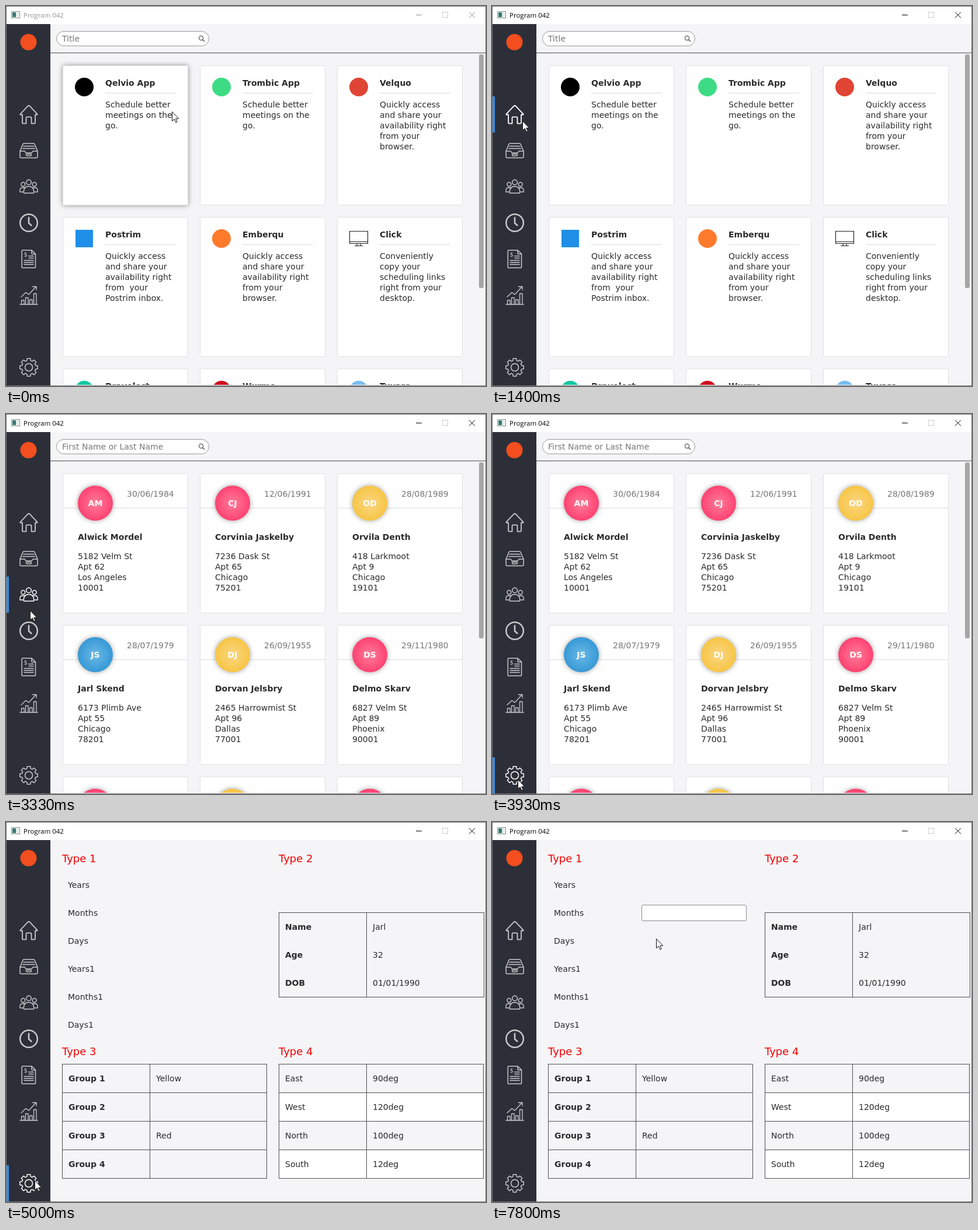
An HTML page that plays this animation: 822x652 px, repeating every 8000 ms.

```html
<!DOCTYPE html>
<html lang="en">
<head>
<meta charset="utf-8">
<title>Dashboard</title>
<style>
html, body { margin: 0; width: 100%; height: 100%; overflow: hidden; background: #f5f5f8; }
svg { display: block; width: 822px; height: 652px; }
text { font: 14px "DejaVu Sans", Verdana, sans-serif; fill: #2b2b2b; white-space: pre; }
.bold { font-weight: bold; }
.muted { fill: #777; }
.heading { font-size: 18px; fill: #f00000; }
.initials { font-weight: bold; fill: #fff; text-anchor: middle; }
.caption { font: 11.5px "Open Sans", "Noto Sans", sans-serif; fill: var(--title-ink); }
.control { fill: none; stroke: var(--title-ink); }
.card { fill: #fff; stroke: #e0e0e4; }
.card.lit { filter: drop-shadow(0 0 4px rgba(0, 0, 0, .42)); }
.rule { stroke: #dcdcdc; }
.grid { fill: none; stroke: #505052; }
.field { fill: #fff; stroke: #8c8c8c; }
.icon { fill: none; stroke: #c9c9cc; stroke-width: 1.5; stroke-linejoin: round; stroke-linecap: round; }
.icon text { font-size: 10px; fill: #c9c9cc; stroke: none; }
.icon.lit { stroke: #fff; }
.icon.lit text { fill: #fff; }
.avatar { filter: drop-shadow(0 0 4px rgba(0, 0, 0, .38)); }
</style>
</head>
<body>
<svg id="stage" viewBox="0 0 822 652"></svg>
<script>
const text = (x, y, s, cls = '') => `<text x="${x}" y="${y}" class="${cls}">${s}</text>`;
const rect = (x, y, w, h, attrs = '') => `<rect x="${x}" y="${y}" width="${w}" height="${h}" ${attrs}/>`;
const circle = (x, y, r, attrs = '') => `<circle cx="${x}" cy="${y}" r="${r}" ${attrs}/>`;
const path = (d, attrs = '') => `<path d="${d}" ${attrs}/>`;
const lines = (x, y, list) => list.map((s, i) => text(x, y + i * 18, s)).join('');
const cardSpot = i => [97 + (i % 3) * 235, 102 + Math.floor(i / 3) * 260];
const cardBox = (x, y) => rect(x + .5, y + .5, 214, 239, 'rx="2" class="card"');

function gearPath() {
  const points = [];
  for (let i = 0; i < 8; i++) {
    for (const [offset, r] of [[-.27, 12], [-.18, 15.4], [.18, 15.4], [.27, 12]]) {
      const a = i * Math.PI / 4 + offset;
      points.push((16 + r * Math.cos(a)).toFixed(1) + ' ' + (16 + r * Math.sin(a)).toFixed(1));
    }
  }
  return 'M' + points.join('L') + 'z';
}

// Sidebar entries: centre y, artwork in a 32px box
const menu = [
  [186, path('M5 16.5H2.2q-1.7 0-.5-1.4L14.2 1.8q1.8-1.7 3.6 0L30.3 15.1q1.2 1.4-.5 1.4H27V30q0 1.6-1.6 1.6H20.5V22q0-1.6-1.6-1.6h-5.8q-1.6 0-1.6 1.6v9.6H6.6Q5 31.6 5 30z', 'stroke-width="1.8"')],
  [248, path('M1 17 6 5q.5-1.3 2-1.3h16q1.5 0 2 1.3l5 12v9.5q0 2-2 2H3q-2 0-2-2zh7.5q1 0 1.5 1.5t1.5 1.5h9q1 0 1.5-1.5t1.5-1.5H31M7 8.5h18M5.5 12.5h21') + rect(11.5, 22, 9, 3, 'rx="1.2"')],
  [310, circle(16, 8.5, 4.3) + circle(6.3, 12, 3.4) + circle(25.7, 12, 3.4) +
    path('M7.5 27v-3.5q0-8 8.5-8t8.5 8V27zM7.5 25H.8v-2.5q0-5 5.5-5 2.5 0 4 1M24.5 25h6.7v-2.5q0-5-5.5-5-2.5 0-4 1', 'stroke-width="1.3"')],
  [372, circle(16, 16, 14.8, 'stroke-width="2.5"') + path('M16 7v9.5l4.5 4', 'stroke-width="2.5"')],
  [434, path('M5.5 1H21l6.5 6.5V30q0 1.3-1.3 1.3H5.5q-1.3 0-1.3-1.3V2.3Q4.2 1 5.5 1zM21 1v6.5h6.5M16 11h8M16 14.5h8M8 18.5h16M8 22h16M8 25.5h16') + text(7.5, 12, '$')],
  [496, path('M1 32h30M3.5 32v-7h4.5v7M10.5 32V20.5H15V32M17.5 32v-8H22v8M24.5 32V13.5H29V32M3 19l8-7.5 5 3.5L28 2M22.5 1.5H29V7', 'stroke-width="1.3"')],
  [620, path(gearPath()) + circle(16, 16, 6.5)],
];

const bookings = ['Quickly access', 'and share your', 'availability right'];
const apps = [
  ['Qelvio App', '#000', ['Schedule better', 'meetings on the', 'go.']],
  ['Trombic App', '#3ddc84', ['Schedule better', 'meetings on the', 'go.']],
  ['Velquo', '#e04434', [...bookings, 'from your', 'browser.']],
  ['Postrim', '#1f8fe8', [...bookings, 'from  your', 'Postrim inbox.']],
  ['Emberqu', '#ff7a2c', [...bookings, 'from your', 'browser.']],
  ['Click', '', ['Conveniently', 'copy your', 'scheduling links', 'right from your', 'desktop.']],
  ['Dravolect', '#12c8a4', []],
  ['Wurmo', '#d01020', []],
  ['Tuvaro', '#78bdf0', []],
];

function appIcon(name, color, x, y) {
  if (!color) {
    return path(`M${x - 15.5} ${y - 12.5}h31v21h-31zM${x - 15.5} ${y + 5.5}h31M${x - 3} ${y + 8.5}v4M${x + 3} ${y + 8.5}v4M${x - 7} ${y + 12.5}h14`, 'fill="none" stroke="#222" stroke-width="1.2"');
  }
  const fill = `fill="${color}"`;
  return name === 'Postrim' ? rect(x - 15, y - 15, 30, 30, fill) : circle(x, y, 16, fill);
}

function appCard([name, color, body], i) {
  const [x, y] = cardSpot(i);
  return cardBox(x, y) + appIcon(name, color, x + 37, y + 37) + text(x + 73, y + 35, name, 'bold') +
    path(`M${x + 73} ${y + 47.5}h121`, 'class="rule"') + lines(x + 73, y + 72, body);
}

const people = [
  ['AM', 'pink', '30/06/1984', 'Alwick Mordel', '5182 Velm St', 'Apt 62', 'Los Angeles', '10001'],
  ['CJ', 'pink', '12/06/1991', 'Corvinia Jaskelby', '7236 Dask St', 'Apt 65', 'Chicago', '75201'],
  ['OD', 'gold', '28/08/1989', 'Orvila Denth', '418 Larkmoot', 'Apt 9', 'Chicago', '19101'],
  ['JS', 'blue', '28/07/1979', 'Jarl Skend', '6173 Plimb Ave', 'Apt 55', 'Chicago', '78201'],
  ['DJ', 'gold', '26/09/1955', 'Dorvan Jelsbry', '2465 Harrowmist St', 'Apt 96', 'Dallas', '77001'],
  ['DS', 'pink', '29/11/1980', 'Delmo Skarv', '6827 Velm St', 'Apt 89', 'Phoenix', '90001'],
  ['', 'pink', '', ''], ['', 'gold', '', ''], ['', 'pink', '', ''],
];

function personCard([initials, tone, date, name, ...address], i) {
  const [x, y] = cardSpot(i);
  return cardBox(x, y) + path(`M${x + 1} ${y + 59.5}h213`, 'class="rule"') +
    circle(x + 56, y + 51, 30, `fill="url(#${tone})" class="avatar"`) +
    text(x + 56, y + 56, initials, 'initials') + text(x + 110, y + 40, date, 'muted') +
    text(x + 26, y + 114, name, 'bold') + lines(x + 26, y + 147, address);
}

const listPage = (id, hint, thumb, cards) => `<g id="${id}">
  ${rect(86.5, 43.5, 261, 25, 'rx="12.5" fill="#fff" stroke="#9a9a9a"')}${text(96, 61, hint, 'muted')}
  ${circle(334, 55, 3.6, 'fill="none" stroke="#555" stroke-width="1.2"')}${path('M336.7 57.7l3.3 3.3', 'stroke="#555" stroke-width="1.5"')}
  ${path('M76 80.5h745', 'stroke="#4c4c50"')}${rect(810, 83, 8, thumb, 'rx="3" fill="#a6a6a6"')}
  <g clip-path="url(#view)">${cards}</g></g>`;

function table(x, y, width, step, rows, keyClass, ruled) {
  const height = Math.round(rows.length * step);
  return rows.map(([key, value], i) =>
    (ruled && i ? path(`M${x} ${y + i * step + .5}h${width}`, 'class="grid"') : '') +
    text(x + 11, y + 30 + i * step, key, keyClass) + text(x + 161, y + 30 + i * step, value)).join('') +
    rect(x + .5, y + .5, width, height, 'class="grid"') + path(`M${x + 150.5} ${y}v${height}`, 'class="grid"');
}

const settings = `<g id="settings">` +
  [['Type 1', 96, 69], ['Type 2', 467, 69], ['Type 3', 96, 400], ['Type 4', 467, 400]]
    .map(([s, x, y]) => text(x, y, s, 'heading')).join('') +
  ['Years', 'Months', 'Days', 'Years1', 'Months1', 'Days1'].map((s, i) => text(106, 113 + i * 48, s)).join('') +
  table(467, 155, 351, 48.2, [['Name', 'Jarl'], ['Age', '32'], ['DOB', '01/01/1990']], 'bold') +
  table(96, 415, 350, 49, [['Group 1', 'Yellow'], ['Group 2', ''], ['Group 3', 'Red'], ['Group 4', '']], 'bold', true) +
  rect(468, 465, 349, 48, 'fill="#fff"') + rect(468, 563, 349, 48, 'fill="#fff"') +
  table(467, 415, 350, 49, [['East', '90deg'], ['West', '120deg'], ['North', '100deg'], ['South', '12deg']], '', true) +
  `<g id="field">${rect(256.5, 94.5, 179, 27, 'rx="2.5" class="field"')}
  ${rect(264, 99, 1.5, 17, 'id="caret" fill="#8a8a8a"')}</g></g>`;

const gradient = (id, inner, outer) => `<radialGradient id="${id}"><stop stop-color="${inner}"/><stop offset="1" stop-color="${outer}"/></radialGradient>`;
const $ = id => document.getElementById(id);

$('stage').innerHTML = `<defs>
  ${gradient('pink', '#ff7d98', '#ff4272')}${gradient('gold', '#fbd583', '#f7c646')}${gradient('blue', '#6cb9e6', '#3699d6')}
  <clipPath id="view">${rect(77, 81, 733, 569)}</clipPath></defs>
  ${rect(0, 0, 822, 652, 'fill="#f5f5f8"')}
  ${listPage('apps', 'Title', 401, apps.map(appCard).join(''))}
  ${listPage('people', 'First Name or Last Name', 302, people.map(personCard).join(''))}
  ${settings}
  ${rect(1, 1, 820, 30, 'fill="#fff"')}
  ${rect(9.5, 9.5, 14, 11, 'fill="#e8eeee" stroke="#8a9294"')}${rect(11, 11, 6, 8, 'fill="#35796f"')}
  ${text(30, 20, 'Program 042', 'caption')}
  ${path('M702 15.5h10M793 10.5l10 10M803 10.5l-10 10', 'class="control"')}
  ${rect(747.5, 10.5, 9, 9, 'fill="none" stroke="#ccc"')}
  ${rect(1, 31, 75, 620, 'fill="#2d2f38"')}
  ${circle(38.5, 62, 14, 'fill="#f24e1e"')}
  ${rect(1, 0, 4, 62, 'id="bar" fill="#3a8ade"')}
  ${menu.map(([y, art]) => `<g class="icon" transform="translate(23 ${y - 16})">${art}</g>`).join('')}
  ${rect(.5, .5, 821, 651, 'fill="none" stroke="#747476"')}
  <g id="pointer">${path('M.5.5v16l3.7-3.5 2.6 5.8 2.4-1-2.5-5.6h5z', 'id="arrow" fill="#fff" stroke="#111"')}
  ${path('M-3-7.5h2.5l.5.5.5-.5H3M0-7V7M-3 7.5h2.5L0 7l.5.5H3', 'id="beam" fill="none" stroke="#111" stroke-width="1.2"')}</g>`;

// Pointer route: time, x, y
const route = [
  [0, 284, 181], [270, 236, 250], [470, 130, 352], [600, 84, 332], [733, 66, 288], [867, 62, 240],
  [1133, 52, 197], [1600, 52, 197], [1867, 46, 290], [2067, 42, 352], [2267, 41, 312],
  [3267, 41, 312], [3600, 42, 440], [3933, 44, 627], [4933, 44, 627], [5000, 49, 615],
  [5200, 118, 490], [5467, 240, 230], [5667, 292, 84], [5800, 293, 100], [5867, 294, 106],
  [6067, 294, 106], [6133, 294, 107], [6400, 294, 107], [6733, 281, 148], [6800, 281, 148],
  [6933, 281, 154], [7333, 281, 154], [7800, 281, 200], [8000, 281, 200],
];

function pointerAt(t) {
  const i = route.findIndex(key => key[0] > t);
  const [t0, x0, y0] = route[i - 1], [t1, x1, y1] = route[i];
  const k = (t - t0) / (t1 - t0);
  return [Math.round(x0 + (x1 - x0) * k), Math.round(y0 + (y1 - y0) * k)];
}

const icons = [...document.querySelectorAll('.icon')];
const firstCard = document.querySelector('#apps .card');
const show = (id, on) => $(id).setAttribute('visibility', on ? 'inherit' : 'hidden');
const TICK = 1000 / 15;

function render(now) {
  const t = Math.floor(((now % 8000) + 4) / TICK) % 120 * TICK;
  const [x, y] = pointerAt(t);
  const page = t < 2660 ? 'apps' : t < 4260 ? 'people' : 'settings';
  for (const id of ['apps', 'people', 'settings']) show(id, id === page);
  $('stage').style.setProperty('--title-ink', t < 1395 ? '#929292' : '#000');

  const hovered = x < 76 ? menu.findIndex(([cy]) => y >= cy - 31 && y < cy + 31) : -1;
  show('bar', hovered >= 0);
  if (hovered >= 0) $('bar').setAttribute('y', menu[hovered][0] - 31);
  icons.forEach((icon, i) => icon.classList.toggle('lit', i === hovered));
  firstCard.classList.toggle('lit', x >= 97 && x < 312 && y >= 102 && y < 342);

  const editing = t >= 6130;
  const row = t < 7130 ? 0 : 1;
  const focusTime = row ? 7130 : 6130;
  const top = 94 + row * 48;
  show('field', editing);
  $('field').setAttribute('transform', `translate(0 ${row * 48})`);
  show('caret', editing && (t - focusTime) % 1000 < 500);

  const overField = editing && x > 256 && y >= top && y <= top + 28;
  show('arrow', !overField);
  show('beam', overField);
  $('pointer').setAttribute('transform', `translate(${x} ${y})`);
}

function frame() {
  render(performance.now());
  requestAnimationFrame(frame);
}
frame();
</script>
</body>
</html>
```
